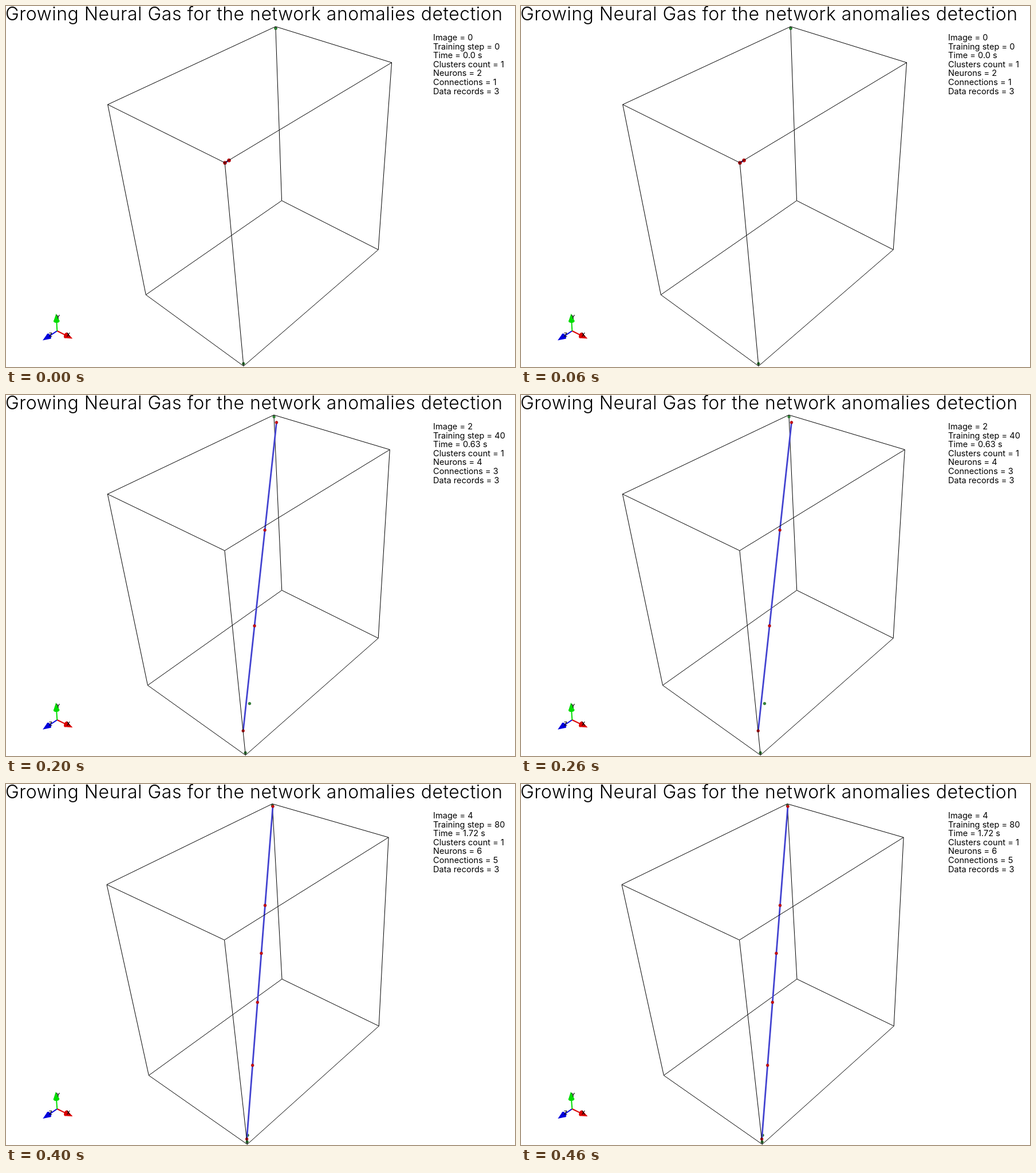
Animation of 889 by 630 pixels, one loop 500 ms. Source, as an HTML page:

```html
<!DOCTYPE html>
<html lang="en">
<head>
<meta charset="utf-8">
<title>Growing Neural Gas</title>
<style>
  html, body { margin: 0; width: 100%; height: 100%; overflow: hidden; background: #fff; }
  svg { display: block; }
  text { font-family: Inter, Lato, sans-serif; }
  .title { font-size: 32px; font-weight: 300; letter-spacing: .5px; }
  .info { font-size: 14.6px; }
  .axis { font-size: 9px; font-weight: 600; text-anchor: middle; }
  .edge { fill: none; stroke: #000; }
  .link { fill: none; stroke: #4343d0; stroke-width: 2.8; }
  .neuron { fill: #d20a0f; stroke: #8c0a10; stroke-width: .7; }
  .record { fill: #2f8a35; stroke: #1d5a22; stroke-width: .7; }
</style>
</head>
<body>
<svg width="889" height="630" viewBox="0 0 889 630">
  <path id="back" class="edge"/>
  <g id="records"></g>
  <path id="links" class="link"/>
  <g id="neurons"></g>
  <path id="front" class="edge"/>
  <g id="triad"></g>
  <text class="axis" x="91" y="546">Y</text>
  <text class="axis" x="109" y="577">X</text>
  <text class="axis" x="78" y="577">Z</text>
  <text class="title" x="-1" y="24.5">Growing Neural Gas for the network anomalies detection</text>
  <g id="info"></g>
</svg>
<script>
const STEPS = 5, STEP_MS = 100;
const RAD = Math.PI / 180;
const FOCAL = 315 / Math.tan(15 * RAD);
const DECAY = 0.365;            // share of the remaining way left after each step
const INSET = 3;                // gap between the data and the box
const FIRST_BOX = [341, 535.5, 510], BOX = [339, 539, 507];
const DRIFT = [71, -88, 16];
// Inner neurons along the chain: step of birth, place at birth, final place.
const INNER = [[1, .5, .313], [4, .47, .47], [2, .69, .605], [3, .819, .785]];

const $ = id => document.getElementById(id);
const mix = (a, b, k) => a.map((v, i) => v + (b[i] - v) * k);

// Isometric view: right, up and toward the viewer, with the camera rolled.
function view([x, y, z], roll) {
  const r = (x - z) / Math.SQRT2, u = (2 * y - x - z) / Math.sqrt(6);
  const c = Math.cos(roll), s = Math.sin(roll);
  return [r * c - u * s, r * s + u * c, (x + y + z) / Math.sqrt(3)];
}

function edges(corner, project) {
  let back = '', front = '';
  for (let i = 0; i < 8; i++) {
    for (const bit of [1, 2, 4]) {
      if (i & bit) continue;
      const line = `M${project(corner(i))}L${project(corner(i | bit))}`;
      if (i === 0) back += line; else front += line;
    }
  }
  return { back, front };
}

function chain(n, top, bottom, near) {
  const left = DECAY ** n;
  const last = mix(bottom, near, left);
  const first = n ? top.map((v, i) => v + DRIFT[i] * left) : [near[0], near[1], near[2] - 10];
  const inner = INNER.filter(([born]) => born <= n)
    .map(([born, from, to]) => mix(first, last, to + (from - to) * DECAY ** (n - born)));
  return [first, ...inner, last];
}

function arrow(axis, color, roll) {
  const [x, y] = view(axis, roll).map(v => v * 37);
  const angle = Math.atan2(-y, x) / RAD, length = Math.hypot(x, y);
  return `<g transform="translate(89.3 567) rotate(${angle})" fill="${color}">
    <path d="M0 0H18" stroke="${color}" stroke-width="2"/>
    <path d="M${length} 0L17 -5.3V5.3Z"/><ellipse cx="17" rx="3" ry="5.3"/></g>`;
}

const dots = (points, kind, r) =>
  points.map(([x, y]) => `<circle class="${kind}" cx="${x}" cy="${y}" r="${r}"/>`).join('');

function show(n) {
  const roll = (3.27 + .28 * n) * RAD;
  const size = n ? BOX : FIRST_BOX;
  const distance = Math.hypot(...size) / 2 / Math.sin(15 * RAD);
  const project = p => {
    const [x, y, near] = view(p, roll), k = FOCAL / (distance - near);
    return [444.5 + x * k, 315 - y * k];
  };
  const place = (signs, inset) => signs.map((s, i) => s * (size[i] / 2 - inset));
  const corner = i => place([1, 2, 4].map(bit => i & bit ? 1 : -1), 0);

  const { back, front } = edges(corner, project);
  $('back').setAttribute('d', back);
  $('front').setAttribute('d', front);

  const top = place([-1, 1, -1], INSET);
  const bottom = place([1, -1, 1], INSET);
  const neurons = chain(n, top, bottom, place([1, 1, 1], INSET)).map(project);
  const records = [top, bottom, mix(bottom, top, DECAY ** n)].map(project);
  $('links').setAttribute('d', 'M' + neurons.join('L'));
  $('neurons').innerHTML = dots(neurons, 'neuron', n ? 2.4 : 3);
  $('records').innerHTML = dots(records, 'record', 2.3);

  $('triad').innerHTML = arrow([0, 0, 1], '#0000dc', roll)
    + arrow([1, 0, 0], '#dc0000', roll) + arrow([0, 1, 0], '#00dc00', roll);

  $('info').innerHTML = [
    `Image = ${n}`,
    `Training step = ${n * 20}`,
    `Time = ${['0.0', '0.01', '0.63', '1.19', '1.72'][n]} s`,
    'Clusters count = 1',
    `Neurons = ${neurons.length}`,
    `Connections = ${neurons.length - 1}`,
    'Data records = 3'
  ].map((line, i) => `<text class="info" x="746" y="${60 + i * 15.6}">${line}</text>`).join('');
}

let shown = -1;
function tick() {
  const n = Math.floor(performance.now() / STEP_MS) % STEPS;
  if (n !== shown) show(shown = n);
  requestAnimationFrame(tick);
}
tick();
</script>
</body>
</html>
```
